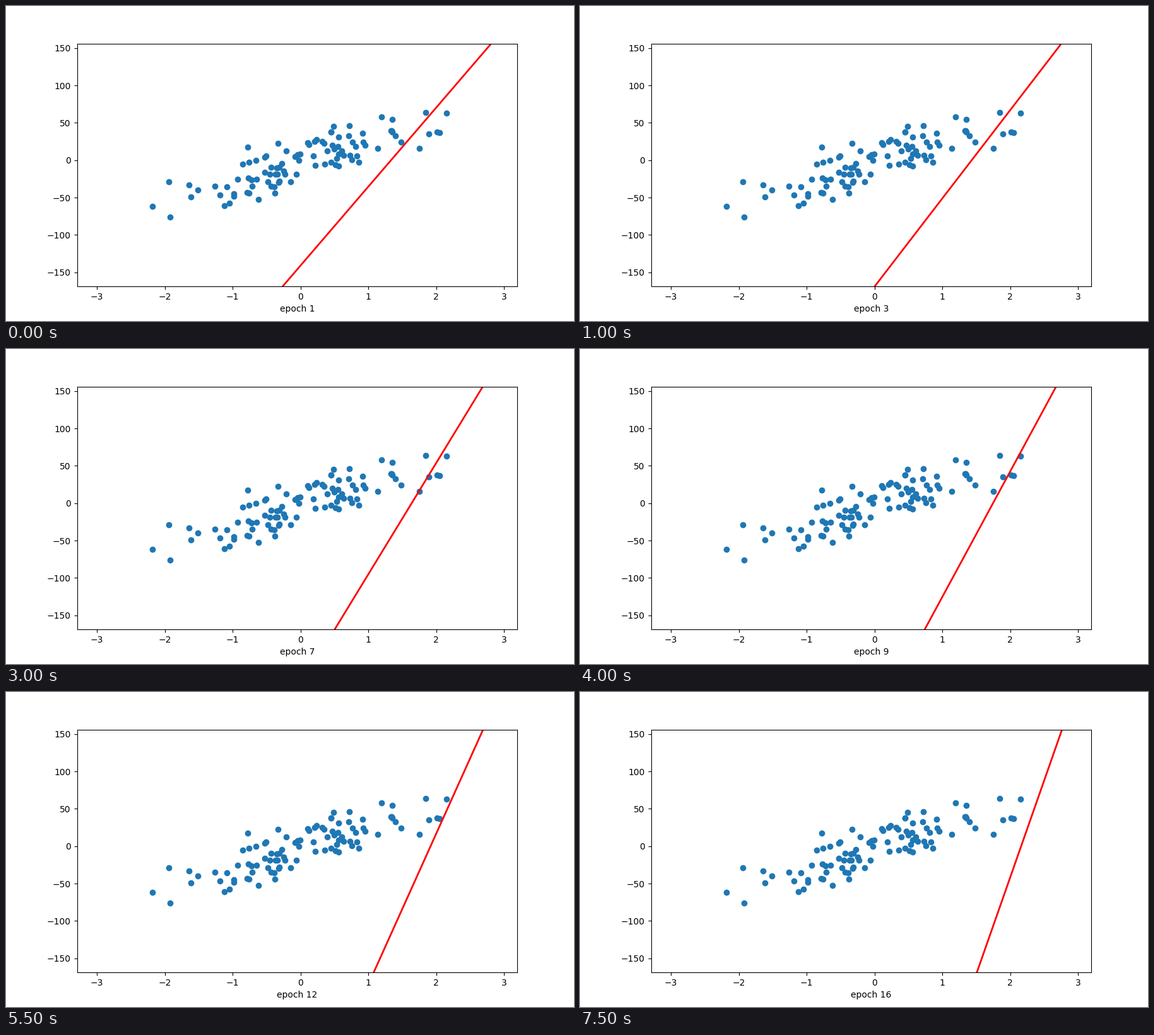
These frames come from a looping animation (900 px wide and 500 px high, 8 s). A matplotlib script:

```python
import numpy as np
import matplotlib.pyplot as plt
from matplotlib.animation import FuncAnimation

EPOCHS = 16
RATE = 0.0005

# Noisy linear data
rng = np.random.RandomState(13)
x = rng.randn(100)
slope = 100 * rng.uniform()
y = slope * x + rng.normal(scale=20, size=x.size)


def fit_path(m, b):
    """Slope and intercept per epoch; the steps climb the squared error."""
    path = []
    for _ in range(EPOCHS):
        path.append((m, b))
        err = y - m * x - b
        m, b = m - 2 * RATE * np.sum(err * x), b - 2 * RATE * np.sum(err)
    return path


path = fit_path(m=105.65, b=-141.0)

fig, ax = plt.subplots(figsize=(9, 5), dpi=100)
line_x = np.arange(-3, 3, 0.1)
ax.scatter(x, y)
line, = ax.plot(line_x, 50 * line_x - 4, "r-", linewidth=2)
ax.set_xlim(-3.295, 3.195)
ax.set_ylim(-168.75, 155.75)


def update(i):
    m, b = path[i]
    line.set_ydata(m * line_x + b)
    ax.set_xlabel(f"epoch {i + 1}")
    return line, ax


anim = FuncAnimation(fig, update, frames=EPOCHS, interval=500,
                     repeat=True, repeat_delay=0)
plt.show()
```
